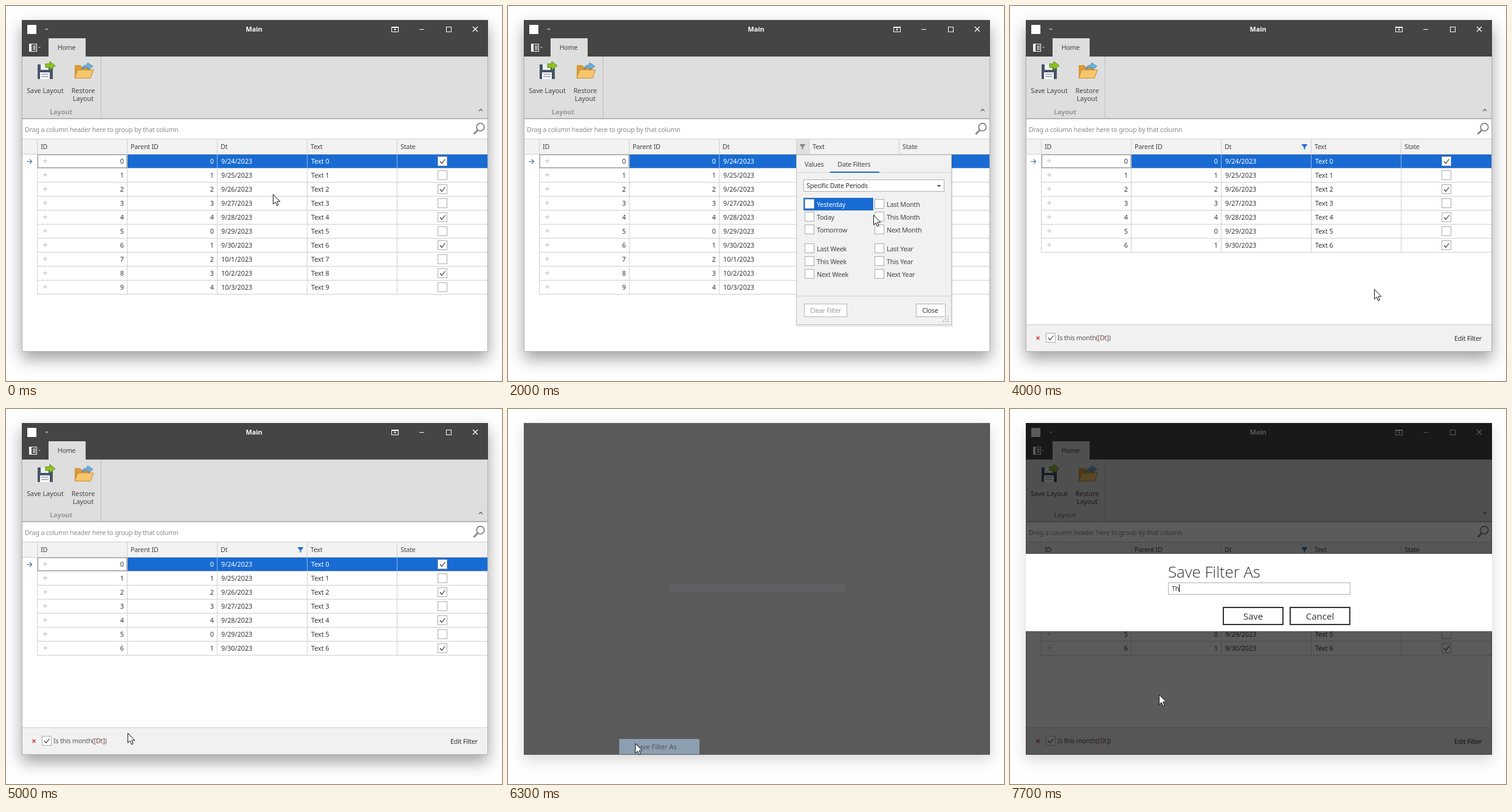
An HTML page that plays this animation: 816x616 px, repeating every 8 s.

```html
<!DOCTYPE html>
<html lang="en">
<head>
<meta charset="utf-8">
<title>Grid filter</title>
<style>
html, body { margin: 0; width: 100%; height: 100%; overflow: hidden; background: #fefefe; }
#win { position: absolute; left: 26px; top: 23px; width: 767px; height: 545px; box-shadow: 0 12px 24px rgba(0,0,0,.36); }
#win.idle { box-shadow: 0 9px 22px rgba(0,0,0,.15); }
svg { position: absolute; left: 0; top: 0; display: block; }
text { font: 10.8px "Noto Sans", sans-serif; letter-spacing: -.25px; white-space: pre; }
.num { letter-spacing: 0; }
.bold { font-weight: bold; letter-spacing: 0; }
.ui { font: 11.2px "Open Sans", sans-serif; letter-spacing: 0; }
.btn { font: 15px "Open Sans", sans-serif; letter-spacing: 0; }
.big { font: 300 26px "Open Sans", sans-serif; letter-spacing: -.1px; }
</style>
</head>
<body>
<div id="win"></div>
<svg id="stage" width="816" height="616" viewBox="0 0 816 616"></svg>
<script>
const LOOP = 8000, STEP = 100;
const BLUE = '#186bd2', LINE = '#cfcfcf', INK = '#333';
const stage = document.getElementById('stage'), win = document.getElementById('win');

// Pointer tip: time, x, y
const path = [
  [0, 439, 309], [300, 430, 282], [500, 450, 249], [700, 476, 227], [1500, 476, 227],
  [1800, 566, 314], [2000, 601, 343], [2400, 613, 348], [3100, 613, 348],
  [3300, 640, 400], [3600, 690, 508], [3800, 690, 508], [4000, 599, 465],
  [4100, 521, 453], [4200, 521, 453], [4500, 400, 472], [4800, 240, 520],
  [5100, 180, 538], [5600, 180, 538], [5800, 209, 549], [6300, 209, 549],
  [6700, 245, 469], [8000, 245, 469]
];

function pointerAt(t) {
  const i = path.findIndex(p => p[0] > t);
  const [a, b] = [path[i - 1], path[i]];
  const u = (t - a[0]) / (b[0] - a[0]);
  return [1, 2].map(k => Math.round(a[k] + (b[k] - a[k]) * u));
}

const rect = (x, y, w, h, fill) => `<rect x="${x}" y="${y}" width="${w}" height="${h}" fill="${fill}"/>`;
const box = (x, y, w, h, fill, stroke, extra = '') =>
  `<rect x="${x + .5}" y="${y + .5}" width="${w - 1}" height="${h - 1}" fill="${fill}" stroke="${stroke}" ${extra}/>`;
const line = (d, stroke, width = 1, extra = '') =>
  `<path d="${d}" fill="none" stroke="${stroke}" stroke-width="${width}" ${extra}/>`;
const shape = (d, fill) => `<path d="${d}" fill="${fill}"/>`;
const text = (x, y, s, fill = INK, cls = '', anchor = 'start') =>
  `<text x="${x}" y="${y}" fill="${fill}" class="${cls}" text-anchor="${anchor}">${s}</text>`;
const group = (opacity, s) => `<g opacity="${opacity}">${s}</g>`;
const dots = 'stroke-dasharray="1 1"';
const check = (x, y, on) => box(x, y, 16, 16, '#fff', '#acacac') +
  (on ? line(`M${x + 4} ${y + 8}l3 3.5l5.5 -7`, '#3c3c3c', 1.2) : '');
const funnel = fill => shape('M480 227h9v1l-3.5 4v4l-2 -1v-3l-3.5 -4z', fill);

function titleBar() {
  return rect(26, 23, 767, 60, '#454545') + rect(35, 31, 15, 15, '#fff') +
    shape('M64 37h6l-3 3z', '#aaa') + text(408, 42, 'Main', '#fff', 'bold', 'middle') +
    box(634, 34, 12, 9, 'none', '#fff') + line('M634 35.5h12M640 41v-4M638 39l2 -2l2 2', '#fff') +
    line('M680 38.5h8', '#fff') + box(724, 34, 9, 9, 'none', '#fff') +
    line('M768 34l8 8M776 34l-8 8', '#fff', 1.3) +
    box(38, 62, 13, 13, 'none', '#fff') + rect(39, 63, 3, 11, '#fff') +
    line('M44 65.5h5M44 67.5h5M44 69.5h5M44 71.5h5', '#fff') + shape('M53 67h4l-2 2z', '#bbb') +
    rect(70, 53, 61, 30, '#dedede') + text(99.5, 72, 'Home', '#444', '', 'middle');
}

function ribbon() {
  const disk = shape('M52 96h22l3 3v21h-25z', '#465468') + rect(57, 96, 13, 9, '#eef1f5') +
    rect(56, 109, 16, 11, '#fff') + rect(58, 111, 12, 2, '#aab4c0') + rect(58, 115, 12, 2, '#aab4c0') +
    `<path d="M65 95h7v-4l9 7l-9 7v-4h-7z" fill="#8fc31f" stroke="#5f8d16"/>`;
  const folder = shape('M113 97h9l3 3h14v17h-26z', '#d79a3c') + shape('M118 105h26l-5 14h-26z', '#f7c66b') +
    line('M118 105h26l-5 13.5h-26z', '#c48a35') +
    `<path d="M125 104q1 -8 9 -7v-4l9 6l-8 6v-4q-6 -1 -10 3z" fill="#6bb1de" stroke="#357da8" stroke-width=".8"/>`;
  return rect(26, 83, 767, 102, '#dedede') + rect(156, 83, 1, 101, '#bdbdbd') + disk + folder +
    text(64.5, 143, 'Save Layout', '#444', 'num', 'middle') +
    text(127, 143, 'Restore', '#444', 'num', 'middle') + text(127, 156, 'Layout', '#444', 'num', 'middle') +
    text(90.5, 178, 'Layout', '#969696', 'bold', 'middle') + line('M778 172.5l3 -3l3 3', '#666', 1.4);
}

function grid(count, button, filtered) {
  let s = rect(27, 186, 765, 381, '#fff') + rect(26, 184, 767, 2, '#b5b5b5') +
    text(31, 207, 'Drag a column header here to group by that column', '#8c8c8c') +
    `<circle cx="780.5" cy="199" r="6.3" fill="none" stroke="#808080" stroke-width="1.8"/>` +
    line('M776 204l-6.5 6.5', '#808080', 2.6) +
    rect(27, 218, 765, 26, LINE) + rect(27, 219, 765, 24, '#f2f2f2');
  const cols = [51, 199, 347, 495, 643];
  ['ID', 'Parent ID', 'Dt', 'Text', 'State'].forEach((name, i) =>
    s += text(cols[i] + 6, 235, name, '#444'));
  if (button) s += rect(474, 219, 21, 24, button) + rect(474, 219, 1, 24, LINE) + funnel('#858585');
  else if (filtered) s += funnel(BLUE);
  for (let i = 0; i < count; i++) {
    const y = 244 + 23 * i, ink = i ? INK : '#fff';
    s += rect(51, y + 22, 741, 1, LINE);
    if (!i) s += rect(200, y, 592, 22, BLUE) + box(52, y, 147, 22, '#fff', '#333', dots) +
      line('M34 255.5h8M39 252l3.5 3.5l-3.5 3.5', '#4b7292', 1.2);
    s += line(`M61 ${y + 10.5}h7M64.5 ${y + 7}v7`, '#bcbcbc') +
      text(194, y + 15, i, INK, 'num', 'end') + text(342, y + 15, i % 5, ink, 'num', 'end') +
      text(354, y + 15, (i < 7 ? `9/${24 + i}` : `10/${i - 6}`) + '/2023', ink, 'num') +
      text(502, y + 15, 'Text ' + i, ink, 'num') + check(710, y + 3, i % 2 == 0);
  }
  cols.forEach((x, i) => {
    s += rect(x, 219, 1, 24 + 23 * count, LINE);
    if (i > 1) s += rect(x, 244, 1, 22, '#8db8ea');
  });
  return s;
}

function filterBar() {
  return rect(27, 523, 765, 44, '#f1f1f1') + rect(27, 523, 765, 1, LINE) +
    line('M43.5 543l5 5M48.5 543l-5 5', '#d9363e', 1.6) + check(59, 537, true) +
    text(78, 549, 'Is this month(<tspan fill="#7d4646">[Dt]</tspan>)', '#555') +
    text(731, 550, 'Edit Filter');
}

function popup(focus, on) {
  let s = rect(475, 246, 257, 281, 'rgba(0,0,0,.08)') + box(474, 244, 256, 280, '#f1f1f1', '#bcbcbc') +
    text(488, 264, 'Values', '#444') + text(542, 264, 'Date Filters', '#444') +
    rect(475, 273, 254, 1, '#d4d4d4') + rect(530, 272, 81, 2, BLUE) +
    box(486, 285, 232, 20, '#fff', '#b0b0b0') + text(491, 299, 'Specific Date Periods') +
    shape('M705.5 294h7l-3.5 3.5z', '#555');
  ['Yesterday', 'Today', 'Tomorrow', 'Last Week', 'This Week', 'Next Week',
   'Last Month', 'This Month', 'Next Month', 'Last Year', 'This Year', 'Next Year'].forEach((name, i) => {
    const x = i < 6 ? 488 : 603, r = i % 6, y = 317 + 21 * r + (r > 2 ? 10 : 0);
    if (name == focus) s += box(x - 2, y - 2, 115, 21, BLUE, '#0b4da3', dots);
    s += check(x, y, on && name == 'This Month') +
      text(x + 20, y + 13, name, name == focus ? '#fff' : '#444');
  });
  s += rect(475, 476, 254, 1, LINE) + box(487, 489, 71, 22, '#fff', '#b8b8b8') +
    text(522.5, 504, 'Clear Filter', on ? INK : '#999', '', 'middle') +
    box(671, 489, 49, 22, '#fff', '#b0b0b0') + text(694.5, 504, 'Close', INK, '', 'middle');
  for (let i = 0; i < 3; i++)
    for (let j = 2 - i; j < 3; j++) s += rect(715 + 4 * j, 509 + 4 * i, 2, 2, '#b8b8b8');
  return s;
}

function menu(hot) {
  return rect(184, 543, 138, 31, 'rgba(0,0,0,.22)') + rect(183, 542, 137, 31, 'rgba(0,0,0,.3)') +
    box(180, 539, 139, 32, '#f4f4f4', '#a3a3a3') +
    (hot ? rect(183, 542, 133, 26, '#bfdffc') : '') +
    text(209, 559, 'Save Filter As', hot ? '#45566a' : '#222', 'ui');
}

function dialog(t) {
  const typed = t < 7500 ? '' : t < 7700 ? 'T' : 'Th';
  const caret = typed || t < 7100;
  return rect(26, 238, 767, 127, '#fff') + text(260, 277, 'Save Filter As', INK, 'big') +
    box(260, 285, 300, 20, '#fff', '#b0b0b0') + text(266, 299, typed) +
    (caret ? rect(266 + 6 * typed.length, 288, 1, 13, '#111') : '') +
    [['Save', 350], ['Cancel', 460]].map(([name, x]) =>
      `<rect x="${x + 1}" y="326" width="98" height="28" fill="#fff" stroke="#333" stroke-width="2"/>` +
      text(x + 50, 346, name, INK, 'btn', 'middle')).join('');
}

// The dimmed window and dialog emerge from a flat grey sheet.
function modal(t) {
  const k = Math.min(1, (t - 6300) / 500);
  const sheet = rect(26, 23, 767, 545, '#5a5a5a') + rect(266, 288, 288, 13, '#606062') +
    rect(183, 542, 132, 25, '#8c9fb1') + text(209, 559, 'Save Filter As', '#4a4f55', 'ui');
  return rect(26, 23, 767, 545, 'rgba(0,0,0,.645)') + group(1 - k, sheet) + group(k, dialog(t));
}

function render(t) {
  const filtered = t >= 2700, open = t >= 1100 && t < 3700;
  const button = t >= 600 && t < 3700 ? (t < 900 ? '#ebebeb' : '#e1e1e1') : '';
  let s = titleBar() + ribbon() + grid(filtered ? 7 : 10, button, filtered);
  if (filtered) s += filterBar();
  s += line('M26.5 83V567.5H792.5V83', '#b0b0b0');
  if (open) s += popup(t < 2500 ? 'Yesterday' : 'This Month', t >= 2600);
  if (t >= 5300 && t < 6300) s += group(t < 5400 ? .6 : 1, menu(t >= 5700));
  if (t >= 6300) s += modal(t);
  const [x, y] = pointerAt(t);
  s += `<path transform="translate(${x + .5} ${y + .5})" d="M0 0V16L3.7 12.6L6.3 18.5L8.7 17.4L6.2 11.7H11.3Z" fill="#fff" stroke="#111"/>`;
  stage.innerHTML = s;
  win.className = t >= 6300 ? 'idle' : '';
}

let shown = -1;
function tick(now) {
  const t = Math.floor(now % LOOP / STEP) * STEP;
  if (t != shown) render(shown = t);
  requestAnimationFrame(tick);
}
tick(0);
</script>
</body>
</html>
```
